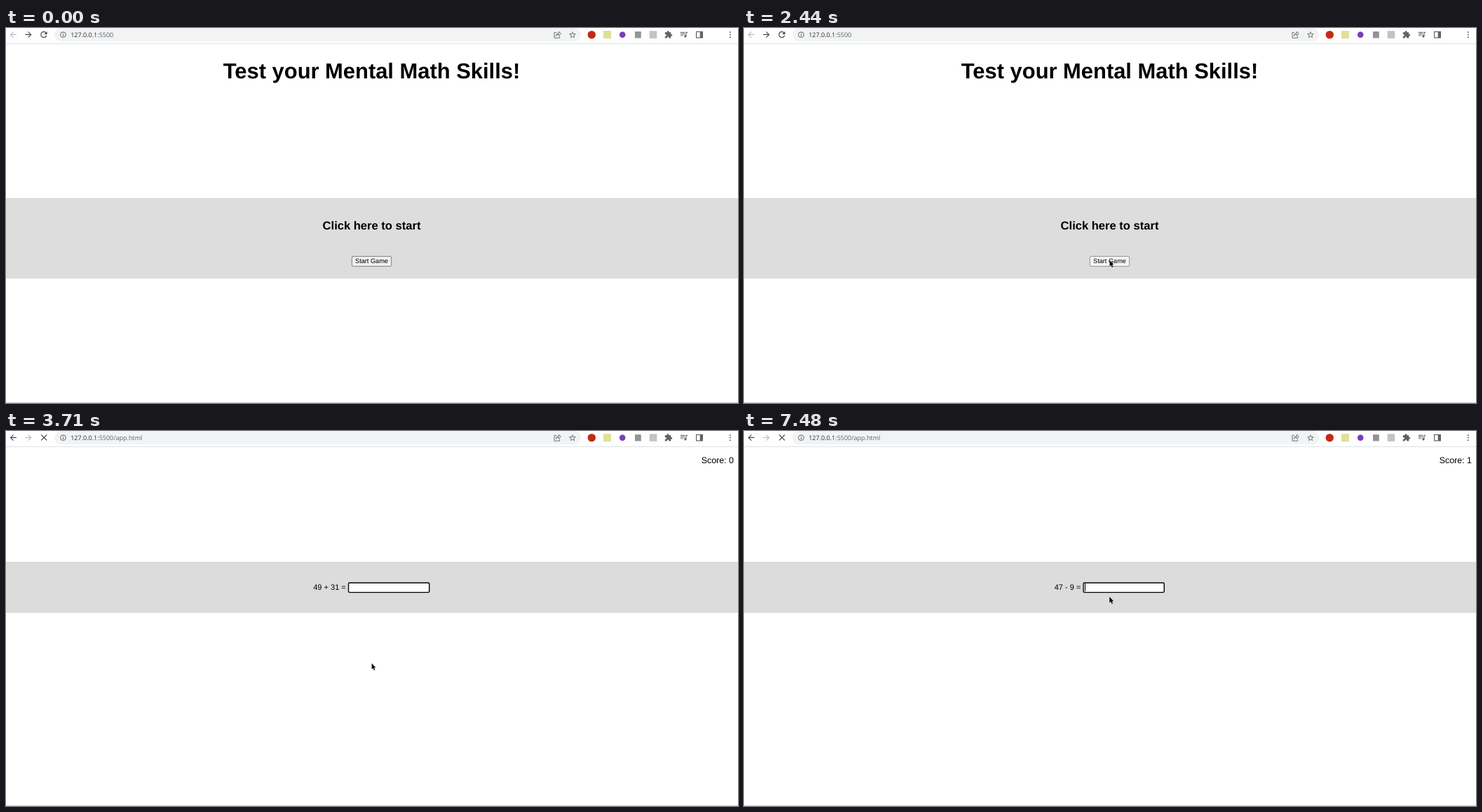
An HTML page for the animation above (8 s loop, 1044 by 536 pixels).

```html
<!DOCTYPE html>
<html lang="en">
<head>
<meta charset="utf-8">
<title>Mental math</title>
<style>
  html, body { margin: 0; width: 100%; height: 100%; overflow: hidden; background: #fff; }
  svg { display: block; font-family: "Liberation Sans", Arial, sans-serif; text-rendering: geometricPrecision; }
  .url { font: 9px "Open Sans", sans-serif; fill: #5f6368; }
  .line { fill: none; stroke: #5f6368; }
</style>
</head>
<body>
<svg width="1044" height="536" viewBox="0 0 1044 536">
  <rect width="1044" height="536" fill="#fff"/>

  <g id="toolbar" fill="#5f6368">
    <rect x="69" y="0" width="751" height="19.3" rx="9.6" fill="#f1f3f4"/>
    <rect y="22" width="1044" height="1" fill="#dfe1e4"/>
    <path id="back" transform="translate(3.4 2.6) scale(.57)" d="M20 11H7.83l5.59-5.59L12 4l-8 8 8 8 1.41-1.41L7.83 13H20z"/>
    <path id="forward" transform="translate(38.8 2.6) scale(-.57 .57)" d="M20 11H7.83l5.59-5.59L12 4l-8 8 8 8 1.41-1.41L7.83 13H20z"/>
    <path id="reload" transform="translate(47 2.5) scale(.58)" fill="#454746" d="M17.65 6.35A7.96 7.96 0 0 0 12 4a8 8 0 1 0 7.73 10h-2.08A6 6 0 1 1 12 6c1.66 0 3.14.69 4.22 1.78L13 11h7V4z"/>
    <path id="stop" class="line" stroke-width="1.3" style="stroke:#454746" d="M50.2 5.4l8 8m0-8l-8 8"/>

    <circle class="line" cx="81.5" cy="9.6" r="3.9"/>
    <path class="line" d="M81.5 9v3M81.5 7v1.1"/>
    <text class="url" x="92.2" y="13"><tspan fill="#2b2d30">127.0.0.1</tspan>:5500<tspan id="path"></tspan></text>

    <path class="line" stroke-width=".9" d="M785 6.4h-3v7.8h7.6v-2.6M784.2 11.4q.5-4 4.2-4.2V5l3 3.1-3 3V8.9q-2.800-.1-4.200 2.500z"/>
    <path transform="translate(802 3.700) scale(.5)" d="M22 9.240l-7.190-.62L12 2 9.190 8.630 2 9.240l5.460 4.730L5.820 21 12 17.270 18.180 21l-1.630-7.030zM12 15.400l-3.760 2.270 1-4.280-3.320-2.880 4.380-.38L12 6.100l1.710 4.040 4.380.38-3.320 2.880 1 4.280z"/>
    <circle cx="835.3" cy="9.6" r="5.7" fill="#c22a14"/>
    <rect x="852" y="4" width="11" height="11" fill="#dfe09a"/>
    <circle cx="879.2" cy="9.6" r="4.3" fill="#7a3db8"/>
    <rect x="897" y="5" width="8.800" height="9.400" fill="#949494"/>
    <rect x="917.700" y="4.200" width="10.600" height="10.600" fill="#c3c3c3"/>
    <path transform="translate(938.800 3.600) scale(.5)" d="M20.500 11H19V7c0-1.100-.9-2-2-2h-4V3.500a2.500 2.500 0 0 0-5 0V5H4c-1.100 0-2 .9-2 2v3.800h1.500a2.700 2.700 0 0 1 0 5.400H2V20c0 1.100.9 2 2 2h3.800v-1.500a2.700 2.700 0 0 1 5.400 0V22H17c1.100 0 2-.9 2-2v-4h1.500a2.500 2.500 0 0 0 0-5z"/>
    <path transform="translate(960.300 2.600) scale(.54)" d="M15 6H3v2h12zm0 4H3v2h12zM3 16h8v-2H3zM17 6v8.180a3 3 0 1 0 2 2.820V8h3V6z"/>
    <rect class="line" x="984.600" y="5.300" width="8.800" height="8.600" stroke-width="1.200"/>
    <rect x="989.700" y="5" width="4" height="9"/>
    <circle cx="1032.800" cy="5.900" r="1"/>
    <circle cx="1032.800" cy="9.600" r="1"/>
    <circle cx="1032.800" cy="13.300" r="1"/>
  </g>

  <g id="home">
    <text x="521.5" y="72" font-size="30.9" font-weight="700" text-anchor="middle">Test your Mental Math Skills!</text>
    <rect y="243" width="1044" height="115" fill="#ddd"/>
    <text x="521.5" y="288" font-size="16.56" font-weight="700" text-anchor="middle">Click here to start</text>
    <rect id="button" x="493.4" y="326.4" width="56.2" height="14.2" rx="1.6" stroke-width=".9"/>
    <text x="521.5" y="336.2" font-size="9.2" text-anchor="middle">Start Game</text>
  </g>

  <g id="game">
    <text id="score" x="991.7" y="46" font-size="12.42"></text>
    <rect y="187" width="1044" height="73" fill="#dcdcdc"/>
    <text id="sum" y="227" font-size="11.04"></text>
    <rect id="field" y="217" width="115.2" height="13.6" rx="1.5" fill="#fff" stroke="#000" stroke-width="1.4"/>
    <text id="answer" x="490.9" y="226.8" font-size="9.2">8</text>
    <rect id="caret" y="218" width="1" height="11"/>
  </g>

  <rect y="535" width="1044" height="1" fill="#c9cacc"/>
  <path id="arrow" d="M0 0V8.400L1.900 6.700L3.300 10L4.700 9.400L3.300 6.300H5.800Z"/>
  <path id="beam" fill="none" stroke="#333" stroke-width=".8" d="M-2-5h1.500L0-4.500.5-5H2M0-4.500v9M-2 5h1.500L0 4.500.5 5H2"/>
</svg>
<script>
const LOOP = 8000;
const el = id => document.getElementById(id);
const show = (id, on) => el(id).setAttribute('visibility', on ? 'visible' : 'hidden');
const set = (id, attrs) => {
  for (const k in attrs) el(id).setAttribute(k, attrs[k]);
};

// Pointer strokes: first and last update, number of updates, start, bend, end.
const moves = [
  { t0: 590, t1: 1380, n: 13, from: [892, 478], bend: [481, -36], to: [585, 255] },
  { t0: 1440, t1: 1510, n: 2, from: [585, 255], bend: [584, 268], to: [583, 280.5] },
  { t0: 1840, t1: 2170, n: 6, from: [583, 280.5], bend: [552, 307], to: [521.6, 332] },
  { t0: 5560, t1: 5830, n: 5, from: [521.6, 332], bend: [521.5, 285], to: [521.3, 237] }
];

const ease = p => p * p * p * (p * (6 * p - 15) + 10);

function pointer(t) {
  const m = moves.filter(m => t >= m.t0).pop();
  if (!m) return null;
  const step = Math.floor((t - m.t0) / (m.t1 - m.t0) * (m.n - 1) + 0.05);
  const p = ease(Math.min(1, (step + 1) / m.n));
  const q = 1 - p;
  return m.from.map((a, i) => q * q * a + 2 * p * q * m.bend[i] + p * p * m.to[i]);
}

// The caret turns over every 530 ms after each new question.
function caretOn(t) {
  if (t >= 6420) return Math.floor((t - 6420) / 530) % 2 === 0;
  if (t >= 3710) return t < 6220 && Math.floor((t - 3710) / 530) % 2 === 1;
  return true;
}

function drawButton(t) {
  const [fill, stroke] =
    t >= 2440 && t < 2510 ? ['#f5f5f5', '#8d8d8d'] :
    t >= 2170 ? ['#e8e8e8', '#555'] : ['#efefef', '#767676'];
  set('button', { fill, stroke });
}

function drawPointer(t, playing) {
  const at = pointer(t);
  const [x, y] = at || [0, 0];
  const overText = !playing && x > 452 && x < 591 && y > 272 && y < 293;
  show('arrow', at && !overText);
  show('beam', at && overText);
  set(overText ? 'beam' : 'arrow', { transform: `translate(${x} ${y})` });
}

function draw(t) {
  const loading = t >= 2710, moved = t >= 2780, playing = t >= 2840;
  const solved = t >= 6420;

  set('back', { fill: moved ? '#454746' : '#babcbe' });
  set('forward', { fill: moved ? '#babcbe' : '#454746' });
  show('reload', !loading);
  show('stop', loading);
  el('path').textContent = loading ? '/app.html' : '';

  el('home').style.display = playing ? 'none' : '';
  el('game').style.display = playing ? '' : 'none';
  drawButton(t);

  el('score').textContent = 'Score: ' + (solved ? 1 : 0);
  el('sum').textContent = solved ? '47 - 9 =' : '49 + 31 =';
  set('sum', { x: solved ? 442.7 : 438.2 });
  set('field', { x: solved ? 484.1 : 488.5 });
  show('answer', t >= 6220 && !solved);
  el('caret').style.display = caretOn(t) ? '' : 'none';
  set('caret', { x: solved ? 486 : 491, fill: t < 2910 ? '#888' : '#000' });

  drawPointer(t, playing);
}

const start = performance.now();
function tick() {
  draw((performance.now() - start) % LOOP);
  requestAnimationFrame(tick);
}
draw(0);
requestAnimationFrame(tick);
</script>
</body>
</html>
```
